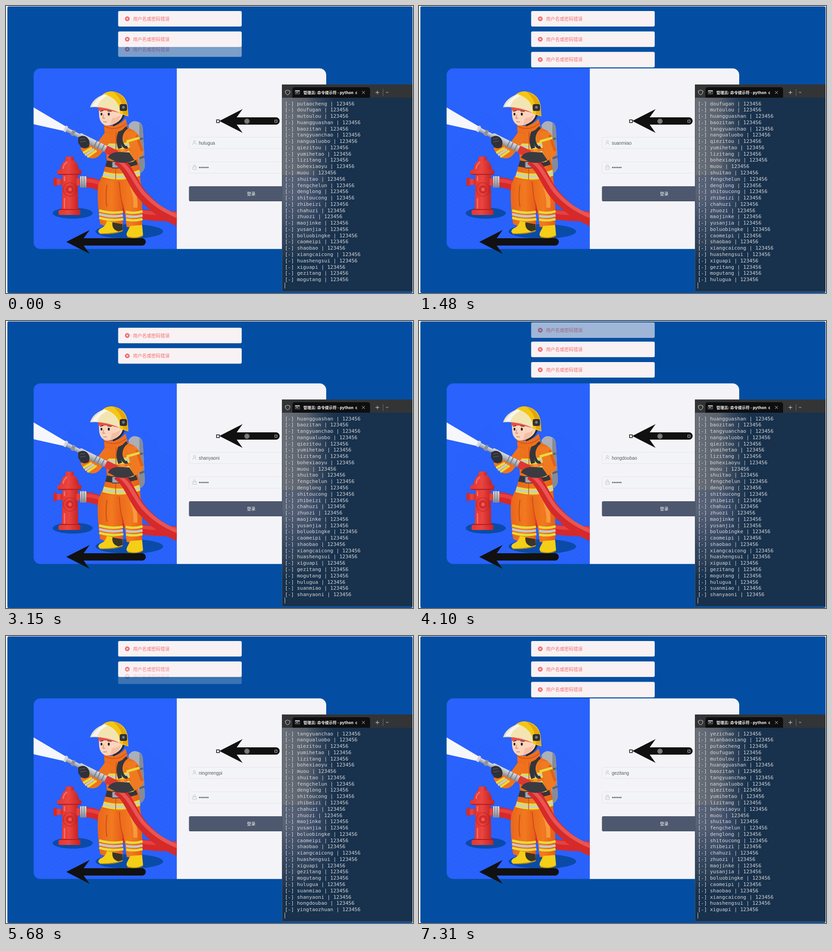
Write an HTML page that moves like this. It is 891 by 629 pixels and loops after 7.41 s.

```html
<!DOCTYPE html>
<html lang="zh">
<head>
<meta charset="utf-8">
<title>Login attempts</title>
<style>
html, body { margin: 0; width: 100%; height: 100%; overflow: hidden; background: #fff; }
svg { display: block; width: 891px; height: 629px; }
text { white-space: pre; }
.cjk { font-family: "Noto Sans CJK SC", "Noto Sans CJK", sans-serif; }
.mono { font: 11px "DejaVu Sans Mono", monospace; fill: #d6d7d8; }
.field { font: 10px "Liberation Sans", Arial, sans-serif; fill: #5c5d62; }
.box { fill: #f3f4f7; stroke: #e3e5ea; }
</style>
</head>
<body>
<svg viewBox="0 0 891 629">
  <defs>
    <clipPath id="stage"><rect x="3" y="1" width="887" height="628" rx="3"/></clipPath>
    <clipPath id="art"><path d="M373.600 136.700H75a14.500 14.500 0 0 0-14.500 14.500V518a14.500 14.500 0 0 0 14.500 14.500H373.600Z"/></clipPath>
    <clipPath id="coat"><path id="coatShape" d="M215 268Q238 278 262 264L282 274L294 372Q252 390 210 378L221 338Z"/></clipPath>
    <pattern id="mesh" width="7" height="9" patternUnits="userSpaceOnUse" patternTransform="rotate(-32) skewX(18)">
      <path d="M0 0H7M0 0V9" fill="none" stroke="#1d4bd0"/>
    </pattern>
    <linearGradient id="glow"><stop offset="0" stop-color="#7b7c81" stop-opacity=".84"/><stop offset=".45" stop-color="#74757c" stop-opacity=".7"/><stop offset="1" stop-color="#40506a" stop-opacity="0"/></linearGradient>
    <linearGradient id="fade" x2="0" y2="1"><stop offset=".5" stop-color="#18314c" stop-opacity="0"/><stop offset=".85" stop-color="#18314c"/></linearGradient>
    <linearGradient id="steel" x2="0" y2="1"><stop offset="0" stop-color="#d9dbe0"/><stop offset=".5" stop-color="#b4b8bf"/><stop offset="1" stop-color="#858a94"/></linearGradient>
    <linearGradient id="red"><stop offset="0" stop-color="#e5352f"/><stop offset=".45" stop-color="#ea4540"/><stop offset="1" stop-color="#c62323"/></linearGradient>
    <linearGradient id="orange"><stop offset="0" stop-color="#e9651a"/><stop offset=".55" stop-color="#f27a20"/><stop offset="1" stop-color="#e75d17"/></linearGradient>
  </defs>

  <rect x="3" y="1" width="887" height="628" rx="3" fill="#034ea2"/>
  <path d="M373.600 136.700H686.500a14.500 14.500 0 0 1 14.500 14.500V518a14.500 14.500 0 0 1-14.500 14.500H373.600Z" fill="#f4f4f8"/>

  <g clip-path="url(#art)">
    <rect x="60" y="136" width="314" height="397" fill="#2962fd"/>
    <path d="M61 330L110 268L150 228L214 300L200 400L215 470L150 533H61ZM300 236L374 310V440L300 440ZM215 470L374 400V533H150Z" fill="url(#mesh)" opacity=".3"/>
    <path d="M60 222L131 264L127 274L60 259Z" fill="#f6f7fb"/>
    <g fill="#0b4ba8">
      <ellipse cx="146" cy="454" rx="44" ry="12"/>
      <ellipse cx="270" cy="494" rx="74" ry="16"/>
    </g>

    <!-- hoses -->
    <g fill="none" stroke-linecap="round">
      <path d="M174 386C206 388 222 402 250 432S320 460 378 461" stroke="#d7282a" stroke-width="22"/>
      <path d="M174 382C208 383 226 398 254 428S320 454 378 455" stroke="#e64140" stroke-width="8"/>
    </g>

    <!-- hydrant -->
    <g fill="url(#red)">
      <rect x="108" y="379" width="18" height="13"/>
      <path d="M124 368H157L158 450H122Z"/>
      <path d="M119 361C120 345 127 337 139 336S159 346 160 361Z"/>
      <rect x="130" y="330" width="18" height="9" rx="3"/>
      <rect x="112" y="359" width="53" height="10" rx="4"/>
      <rect x="115" y="447" width="48" height="11" rx="3"/>
      <rect x="154" y="378" width="10" height="15"/>
      <circle cx="140" cy="402" r="15" stroke="#b81f22"/>
    </g>
    <rect x="104" y="376" width="7" height="19" rx="2" fill="#d22c2b"/>
    <circle cx="140" cy="402" r="9" fill="#cf2b2b"/>
    <circle cx="140" cy="402" r="4" fill="#ec5a54"/>
    <path d="M128 373V384M128 421V444M125 357Q126 346 134 342" fill="none" stroke="#f0716a" stroke-width="3"/>
    <path d="M114 369H164M119 446H161" stroke="#b01d20" stroke-width="2"/>
    <rect x="162" y="373" width="14" height="25" rx="2" fill="url(#steel)"/>
    <path d="M166 373V398M171 373V398" stroke="#777c86" stroke-width="1.500"/>

    <!-- air tank -->
    <path d="M268 262Q276 247 292 255Q300 259 300 274L304 352Q301 367 286 368Z" fill="#abafb8"/>
    <path d="M292 256Q300 260 300 274L304 352Q301 366 291 367Z" fill="#868b96"/>
    <path d="M290 293L300 290M292 334L303 330" stroke="#5c6069" stroke-width="4"/>

    <!-- trousers -->
    <path d="M210 372L253 380L256 483Q230 488 206 478Q198 420 202 392Z" fill="url(#orange)"/>
    <path d="M240 376L293 370Q300 420 298 482Q280 488 264 484Q260 436 248 408Z" fill="url(#orange)"/>
    <path d="M248 385Q250 420 257 444M221 392Q217 420 221 440" fill="none" stroke="#cd4d13" stroke-width="2"/>
    <path d="M276 396Q285 420 283 442" fill="none" stroke="#f79a3d" stroke-width="9"/>
    <g fill="none" stroke-width="5">
      <path d="M204 448Q230 456 256 451M204 464Q230 472 257 467M262 451Q280 456 299 450M263 468Q280 472 299 467" stroke="#e6dc3c"/>
      <path d="M204 456Q230 464 256 459M263 460Q280 464 299 459" stroke="#c6c8c8"/>
    </g>

    <!-- boots -->
    <path d="M221 471L255 478L256 492Q239 501 207 499Q198 495 206 488Q218 484 221 471Z" fill="#f5ce17"/>
    <path d="M233 474L255 478L256 491L246 494Q231 490 233 474Z" fill="#3b3528"/>
    <path d="M272 482L298 480L300 502Q293 509 271 508Q261 504 265 496Z" fill="#f5ce17"/>
    <path d="M205 499Q235 500 255 493M266 506Q287 511 300 503" fill="none" stroke="#b58d10" stroke-width="2"/>

    <!-- coat -->
    <use href="#coatShape" fill="url(#orange)"/>
    <g clip-path="url(#coat)" fill="none">
      <path d="M249 266L258 340" stroke="#f59238" stroke-width="9"/>
      <path d="M215 306Q240 311 270 304M207 367Q250 382 297 364" stroke="#e6dc3c" stroke-width="13"/>
      <path d="M215 306Q240 311 270 304M207 367Q250 382 297 364" stroke="#c9cbc9" stroke-width="5"/>
      <path d="M241 270L240 380" stroke="#c94b14" stroke-width="1.500"/>
      <path d="M218 345Q252 353 286 341" stroke="#34353b" stroke-width="14"/>
    </g>
    <rect x="232" y="341" width="17" height="14" rx="2" fill="#a2a6af" stroke="#45474f" stroke-width="2"/>
    <path d="M255 268Q241 288 250 312" fill="none" stroke="#34353b" stroke-width="9"/>
    <path d="M214 257Q237 272 262 247L266 263Q244 284 216 274Z" fill="#ee701f"/>
    <path d="M215 263Q241 277 265 256" fill="none" stroke="#cc4d14" stroke-width="1.500"/>

    <!-- head -->
    <path d="M203 223Q230 215 258 230L253 247Q242 262 219 262Q206 258 204 242Z" fill="#fbd4bb"/>
    <path d="M202 222Q228 216 260 231L256 237Q228 226 202 230Z" fill="#e94f46"/>
    <path d="M232 246Q242 245 251 239Q247 258 228 261Z" fill="#f5bea4"/>
    <path d="M206 231L213 229M222 230L231 231" stroke="#3a2a28" stroke-width="1.500"/>
    <ellipse cx="209" cy="237" rx="2" ry="3" fill="#23212a"/>
    <ellipse cx="225" cy="237" rx="2.200" ry="3.200" fill="#23212a"/>
    <path d="M214 238L212 246H217M213 254H221" fill="none" stroke="#c9816b" stroke-width="1.300"/>
    <path d="M259 231Q258 253 234 262" fill="none" stroke="#292a30" stroke-width="4"/>
    <path d="M203 207Q211 187 232 187Q260 190 266 217L268 242L252 237Q227 218 199 221Z" fill="#f4c614"/>
    <path d="M235 188Q258 193 265 217L267 240L256 236Q258 207 235 188Z" fill="#e5a50c"/>
    <path d="M216 193Q190 202 184 222Q214 219 249 234Q250 205 216 193Z" fill="#f4e9bf" opacity=".92"/>
    <path d="M216 194Q195 205 188 220L200 220Q204 205 222 197Z" fill="#fff" opacity=".7"/>
    <rect x="249" y="215" width="16" height="15" rx="4" fill="#303037"/>
    <circle cx="257" cy="222" r="3" fill="#777a82"/>

    <!-- near hose, nozzle and arms -->
    <g fill="none">
      <path d="M243 337C270 354 277 390 298 414S340 456 384 475" stroke="#d52a2a" stroke-width="22"/>
      <path d="M246 338C273 356 281 388 301 410S342 448 382 464" stroke="#ea5452" stroke-width="8"/>
    </g>
    <path d="M216 278Q228 275 234 290L207 325Q197 337 183 333Q170 326 163 312L179 300L193 309Z" fill="#ef731e"/>
    <path d="M169 322L188 311M178 331L198 317" stroke="#e6dc3c" stroke-width="5"/>
    <path d="M173 327L193 314" stroke="#c9cbc9" stroke-width="5"/>
    <g transform="translate(128 268) rotate(26.5)">
      <rect y="-7" width="6" height="14" rx="2" fill="#d5d7dc"/>
      <rect x="6" y="-4" width="32" height="9" fill="url(#steel)"/>
      <rect x="18" y="-6" width="7" height="13" rx="2" fill="#8c919b"/>
      <rect x="36" y="-7" width="66" height="15" rx="3" fill="url(#steel)"/>
      <path d="M76-7V8M84-7V8M94-7V8" stroke="#747984" stroke-width="2"/>
      <rect x="101" y="-8" width="27" height="17" rx="3" fill="#dd3833"/>
    </g>
    <path d="M158 288Q169 281 177 288Q186 296 181 309Q172 315 164 309L158 300Z" fill="#303137"/>
    <path d="M162 292L173 290M162 298L175 296" stroke="#55565e" stroke-width="1.500"/>
    <path d="M264 278Q284 267 292 287L301 319Q299 333 272 343L246 341L251 320L274 317Z" fill="#f07a22"/>
    <path d="M286 283L298 318" stroke="#e26018" stroke-width="6"/>
    <path d="M267 318L278 341M260 320L267 341M264 297L292 289" stroke="#e6dc3c" stroke-width="5"/>
    <path d="M265 319L274 341" stroke="#c9cbc9" stroke-width="4"/>
    <path d="M223 332Q230 319 249 320L270 321L281 338Q260 347 242 342Z" fill="#3a3b41"/>
    <path d="M265 266Q249 278 253 297Q258 313 266 309" fill="none" stroke="#34353b" stroke-width="6"/>
  </g>

  <!-- login form -->
  <rect class="box" x="400.500" y="287.500" width="272" height="25" rx="3"/>
  <rect class="box" x="400.500" y="341.500" width="272" height="25" rx="3"/>
  <g fill="none" stroke="#bfc2c9">
    <circle cx="412.500" cy="297" r="2.300"/><path d="M408.500 304Q409 300 412.500 300T416.500 304"/>
    <rect x="409" y="352.500" width="7.500" height="5.500"/><path d="M410.500 352V350a2 2 0 0 1 4 0V352"/>
  </g>
  <text id="user" class="field" x="422" y="303.500"></text>
  <path id="caret" d="M0 294V306" stroke="#333"/>
  <path d="M424 354H443" stroke="#55565c" stroke-width="2.800" stroke-linecap="round" stroke-dasharray="0 3.600"/>
  <rect x="400.500" y="395" width="272.500" height="33" rx="3" fill="#4d586e"/>
  <path d="M402 427.500H672" stroke="#3f4a60"/>
  <text class="cjk" x="527.500" y="415" font-size="9.300" fill="#fff">登录</text>

  <g id="arrows" fill="#111"></g>
  <g fill="none">
    <rect x="461" y="249.500" width="6" height="6" fill="#fff" stroke="#111" stroke-width="1.500"/>
    <rect x="588.500" y="250" width="5" height="5" stroke="#c9c9c9"/>
    <circle cx="527.500" cy="252.500" r="5" stroke="#ddd"/><circle cx="527.500" cy="252.500" r="3.200" fill="#777" stroke="#aaa"/>
  </g>

  <!-- terminal -->
  <rect x="604" y="172" width="286" height="454" fill="#18314c"/>
  <rect x="604" y="201" width="120" height="424" fill="url(#glow)"/>
  <rect x="604" y="370" width="85" height="140" fill="#29407a" opacity=".25"/>
  <rect x="604" y="201" width="120" height="424" fill="url(#fade)"/>
  <rect x="604" y="172" width="286" height="29" fill="#333435"/>
  <path d="M604.500 201V625.500H889" fill="none" stroke="#42505f"/>
  <path d="M627 201V183a5 5 0 0 1 5-5H792a5 5 0 0 1 5 5V201Z" fill="#0e0e0f"/>
  <g fill="none" stroke="#d8d8d8">
    <path d="M616.500 184Q619 186 621.500 186V189Q621 193 616.500 195Q612 193 611.500 189V186Q614 186 616.500 184Z"/>
    <path d="M779.500 186.500L785.500 192.500M785.500 186.500L779.500 192.500M809 189.500H817M813 185.500V193.500M832 188L834.500 190.500L837 188"/>
    <path d="M825.500 182V197" stroke="#6b6b6b"/>
  </g>
  <rect x="633" y="185" width="10" height="8" fill="#33363b" stroke="#8d9095" stroke-width=".6"/>
  <path d="M633 186H643" stroke="#ccc" stroke-width="2"/><path d="M635 189.500H639" stroke="#eee"/>
  <text class="cjk" x="651" y="192.500" font-size="8.500" font-weight="700" fill="#fff">管理员: 命令提示符 - python  c</text>
  <rect x="769" y="181" width="8" height="18" fill="#0e0e0f"/>
  <g id="rows" class="mono"></g>
  <path d="M610.500 606V619" stroke="#ccc"/>

  <g id="toasts" clip-path="url(#stage)"></g>
</svg>
<script>
const LOOP = 7410, REWIND = 7310, ROWS = 29, TOP = 11, GAP = 44.7, HEIGHT = 34;
const names = `yezichao mianbaoxiang putaocheng doufugan mutoulou huangguashan baozitan tangyuanchao
nangualuobo qiezitou yumihetao lizitang bohexiaoyu muou shuitao fengchelun denglong shitoucong zhibeizi
chahuzi zhuozi maojinke yusanjia boluobingke caomeipi shaobao xiangcaicong huashengsui xiguapi gezitang
mogutang hulugua suanmiao shanyaoni hongdoubao yingtaozhuan ningmengpi xingrensu`.split(/\s+/);

const prints = [930, 1980, 3060, 4230, 5300, 6670];
const typed = [1010, 2130, 3260, 4380, 5560, 6790];
// enter and leave time of each message
const messages = [[-2400, 630], [-1200, 1780], [-85, 2890], [1065, 4032], [2180, 5155],
                  [3330, 6540], [4530, 9000], [5630, 9000], [6830, 9000]];

const $ = id => document.getElementById(id);
function add(parent, tag, attrs) {
  const el = document.createElementNS("http://www.w3.org/2000/svg", tag);
  for (const key in attrs) el.setAttribute(key, attrs[key]);
  return parent.appendChild(el);
}

for (const [x, y, len] of [[467, 252, 124], [132, 517, 166]])
  add($("arrows"), "path", { d: `M${x} ${y}l51-26l-13 18H${x + len}a8 8 0 0 1 0 16H${x + 38}l13 18Z` });

const rows = Array.from({ length: ROWS }, (_, i) =>
  add($("rows"), "text", { x: 610.5, y: 217.5 + i * 13.77 }));

const toasts = messages.map(() => {
  const g = add($("toasts"), "g", {});
  add(g, "rect", { x: 245.5, width: 270.5, height: HEIGHT, rx: 3, fill: "#f9f2f4" });
  add(g, "circle", { cx: 265.5, cy: 17, r: 5.2, fill: "#f16b6d" });
  add(g, "path", { d: "M263.7 15.2l3.6 3.6m0-3.6l-3.6 3.6", stroke: "#fff", "stroke-width": 1.1 });
  add(g, "text", { class: "cjk", x: 278, y: 21, "font-size": 10, fill: "#f56c6c" }).textContent = "用户名或密码错误";
  return g;
});

// CSS "ease" curve
function ease(x) {
  if (x <= 0) return 0;
  if (x >= 1) return 1;
  let lo = 0, hi = 1;
  for (let i = 0; i < 20; i++) {
    const s = (lo + hi) / 2, r = 1 - s;
    if (.75 * r * r * s + .75 * r * s * s + s ** 3 < x) lo = s; else hi = s;
  }
  const s = lo, r = 1 - s;
  return .3 * r * r * s + 3 * r * s * s + s ** 3;
}

const passed = (times, t) => times.filter(at => at <= t).length;

function drawToasts(t) {
  let slot = 0;
  messages.forEach(([enter, leave], i) => {
    const gone = ease((t - leave) / 400);
    const y = TOP + slot * GAP + HEIGHT * (ease((t - enter) / 400) - 1 - gone);
    const alpha = ease((t - enter) / 300) * (1 - ease((t - leave) / 300));
    toasts[i].setAttribute("transform", `translate(0 ${y.toFixed(2)})`);
    toasts[i].setAttribute("opacity", alpha.toFixed(3));
    slot += 1 - gone;
  });
}

let shownFirst, shownUser;
function draw(now) {
  const t = now % LOOP, rewound = t >= REWIND;
  const first = rewound ? 0 : 2 + passed(prints, t);
  const user = rewound ? 29 : 31 + passed(typed, t);
  if (first !== shownFirst) {
    rows.forEach((row, i) => row.textContent = `[-] ${names[first + i]} | 123456`);
    shownFirst = first;
  }
  if (user !== shownUser) {
    $("user").textContent = names[user];
    $("caret").setAttribute("transform", `translate(${422.5 + $("user").getComputedTextLength()} 0)`);
    shownUser = user;
  }
  $("caret").style.display = typed.some(at => t >= at && t < at + 90) ? "" : "none";
  drawToasts(rewound ? 6400 : t);
}

const start = performance.now();
function tick() {
  draw(performance.now() - start);
  requestAnimationFrame(tick);
}
tick();
</script>
</body>
</html>
```
